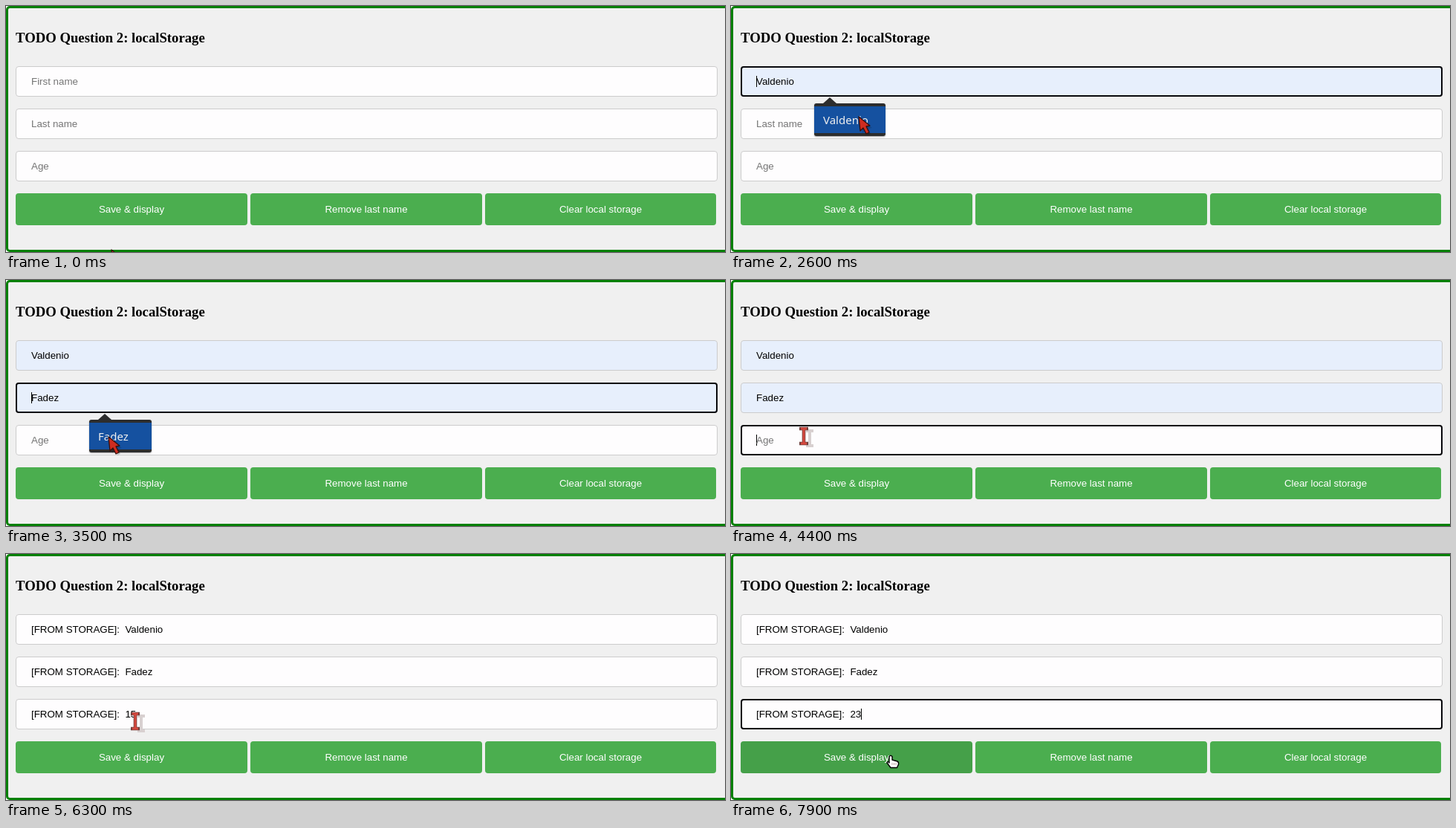
An HTML page that plays this animation: 968x331 px, repeating every 8 s.

```html
<!DOCTYPE html>
<html lang="en">
<head>
<meta charset="utf-8">
<title>localStorage form</title>
<style>
html, body { margin: 0; width: 100%; height: 100%; overflow: hidden; background: #fff; }
body { position: relative; font: 13.333px "Liberation Sans", Arial, sans-serif; }
body * { position: absolute; box-sizing: border-box; }
#panel { left: 0; top: 0; width: 980px; height: 331px; background: #f0f0f0; border: 3px solid green; border-radius: 5px; }
h3 { left: 13px; top: 32px; margin: 0; font: bold 18.72px/22px "Liberation Serif", Times, serif; white-space: pre; }
.field { left: 13px; width: 945px; height: 41px; padding-left: 20px; line-height: 39px; white-space: pre;
  background: #fefdfe; border: 1px solid #ccc; border-radius: 4px; }
.field.empty { color: #757575; }
.field.filled { background: #e7effc; }
.field.focus { outline: 2px solid #08080c; outline-offset: -2px; }
.field i { position: static; display: inline-block; height: 15px; vertical-align: -3px; border-left: 1px solid #000; margin-right: -1px; }
.button { top: 252px; height: 43px; line-height: 43px; text-align: center; color: #fff; background: #4bae4f; border-radius: 4px; }
.button.hover { background: #45a049; }
#popup { left: 112px; height: 44px; background: #2d2d2d; border-radius: 3px; box-shadow: 0 1px 2px rgba(0,0,0,.35); }
#popup::before { content: ""; position: absolute; left: 12px; top: -8px; border: solid transparent; border-width: 0 9px 8px; border-bottom-color: #2d2d2d; }
#item { left: 0; top: 4px; width: 100%; height: 36px; padding-left: 12px; font: 15px/36px "Noto Sans", "Open Sans", sans-serif; color: #eee; }
#item.hover { background: #1551a0; }
svg { left: 0; top: 0; }
</style>
</head>
<body>
<div id="panel"></div>
<h3>TODO Question 2: localStorage</h3>
<div id="popup"><div id="item"></div></div>
<svg width="968" height="331" fill="none" stroke-linejoin="round">
  <g id="cursor">
    <g id="beam">
      <path d="M3-7H13M3 13H13M8-7V13" stroke="#d8d0d0" stroke-width="4"/>
      <path d="M-6-10H6M-6 10H6M0-10V10" stroke="#70403c" stroke-width="4.6"/>
      <path d="M-4-10H4M-4 10H4M0-10V10" stroke="#d5483e" stroke-width="3"/>
    </g>
    <g id="arrow">
      <path d="M3 4L5 22L9 18L12 25L16 23L13 16L18 15Z" fill="#000" opacity=".15"/>
      <path d="M0 0L2 19L6 15L10 23L14 21L10 13L15 12Z" fill="#cf2c20" stroke="#35100c" stroke-width="1.3"/>
    </g>
    <g id="hand">
      <path d="M-2 1.5Q0-1 2 1.5V6L9 8Q11 9 10.500 12L8.500 16.500H0L-5 10Q-4 7-2 10Z" fill="#fff" stroke="#000" stroke-width="1.4"/>
      <path d="M2 10V13M4.500 10V13M7 10V13" stroke="#a88" stroke-width=".8"/>
    </g>
  </g>
</svg>
<script>
const LOOP = 8000, FIRST = 'Valdenio', LAST = 'Fadez', STORED = '[FROM STORAGE]:  ';
const $ = id => document.getElementById(id);
const within = (t, a, b) => t >= a && t < b;

function add(cls, css, text = '') {
  const el = document.createElement('div');
  el.className = cls;
  el.style.cssText = css;
  el.textContent = text;
  $('popup').before(el);
  return el;
}

const labels = ['First name', 'Last name', 'Age'];
const fields = labels.map((_, i) => add('field', `top:${81 + 57 * i}px`));
const buttons = ['Save & display', 'Remove last name', 'Clear local storage'].map((text, i) =>
  add('button', `left:${13 + 316 * i}px;width:${i < 2 ? 312 : 311}px`, text));

// Pointer moves: first step, last step, destination
const moves = [
  [400, 600, 210, 161], [800, 800, 120, 111], [1000, 1000, 98, 97],
  [2200, 2300, 145, 133], [2500, 2600, 172, 149], [3000, 3100, 130, 160],
  [3500, 3500, 138, 211], [3600, 3600, 139, 213], [3800, 4100, 98, 210],
  [4600, 4700, 97, 217], [5100, 5500, 175, 277], [5800, 5900, 126, 156],
  [6000, 6100, 149, 163], [6300, 6300, 174, 225], [7500, 7900, 215, 271]
];

function pointer(t) {
  let x = 142, y = 328;
  for (const [start, end, toX, toY] of moves) {
    if (t < start) break;
    const left = 1 - Math.min(1, (t - start + 100) / (end - start + 100));
    const p = 1 - left * left;
    x += (toX - x) * p;
    y += (toY - y) * p;
  }
  return [Math.round(x), Math.round(y)];
}

// Latest value whose time has come
const latest = (t, steps) => steps.reduce((v, [at, next]) => t >= at ? next : v, '');

function drawField(el, i, value, focused, filled, caret) {
  el.className = 'field' + (value ? '' : ' empty') + (focused ? ' focus' : '') + (filled ? ' filled' : '');
  el.textContent = value || labels[i];
  if (caret) el[caret === 'start' || !value ? 'prepend' : 'append'](document.createElement('i'));
}

function draw(t) {
  const [x, y] = pointer(t);
  const stored = t >= 5700;
  const age = latest(t, [[4600, '1'], [4800, '15'], [6700, '1'], [6800, ''], [7100, '2'], [7300, '23']]);
  const values = [t >= 2500 ? FIRST : '', t >= 3500 ? LAST : '', age];
  const focus = latest(t, [[1200, 0], [3100, 1], [4300, 2], [5500, -1], [6600, 2]]);
  const blink = within(t, 1600, 2200) || within(t, 4000, 4300);
  const preview = within(t, 2500, 2800) || within(t, 3500, 3800);

  fields.forEach((el, i) => {
    const on = focus === i;
    drawField(el, i, stored ? STORED + values[i] : values[i], on,
      !stored && i < 2 && values[i], on && !blink && (preview ? 'start' : 'end'));
  });

  const row = within(t, 1200, 2800) ? 0 : within(t, 3200, 3800) ? 1 : -1;
  const top = 131 + 57 * row, width = row ? 84 : 96;
  const onPopup = row >= 0 && within(x, 112, 112 + width) && within(y, top, top + 44);
  $('popup').style.cssText = `top:${top}px;width:${width}px;display:${row < 0 ? 'none' : 'block'}`;
  $('item').textContent = row ? LAST : FIRST;
  $('item').className = onPopup && within(y, top + 4, top + 40) ? 'hover' : '';

  const onButton = within(y, 252, 295);
  buttons.forEach((el, i) =>
    el.classList.toggle('hover', onButton && within(x, 13 + 316 * i, 325 + 316 * i)));
  const onField = !onPopup && within(y, 81, 236) && (y - 81) % 57 < 41;
  const shape = onButton ? 'hand' : onField ? 'beam' : 'arrow';
  for (const id of ['beam', 'arrow', 'hand']) $(id).style.display = id === shape ? '' : 'none';
  $('cursor').setAttribute('transform', `translate(${x} ${y})`);
}

let shown = -1;
const begin = performance.now();
function tick() {
  const t = Math.floor((performance.now() - begin) % LOOP / 100) * 100;
  if (t !== shown) draw(shown = t);
  requestAnimationFrame(tick);
}
tick();
</script>
</body>
</html>
```
